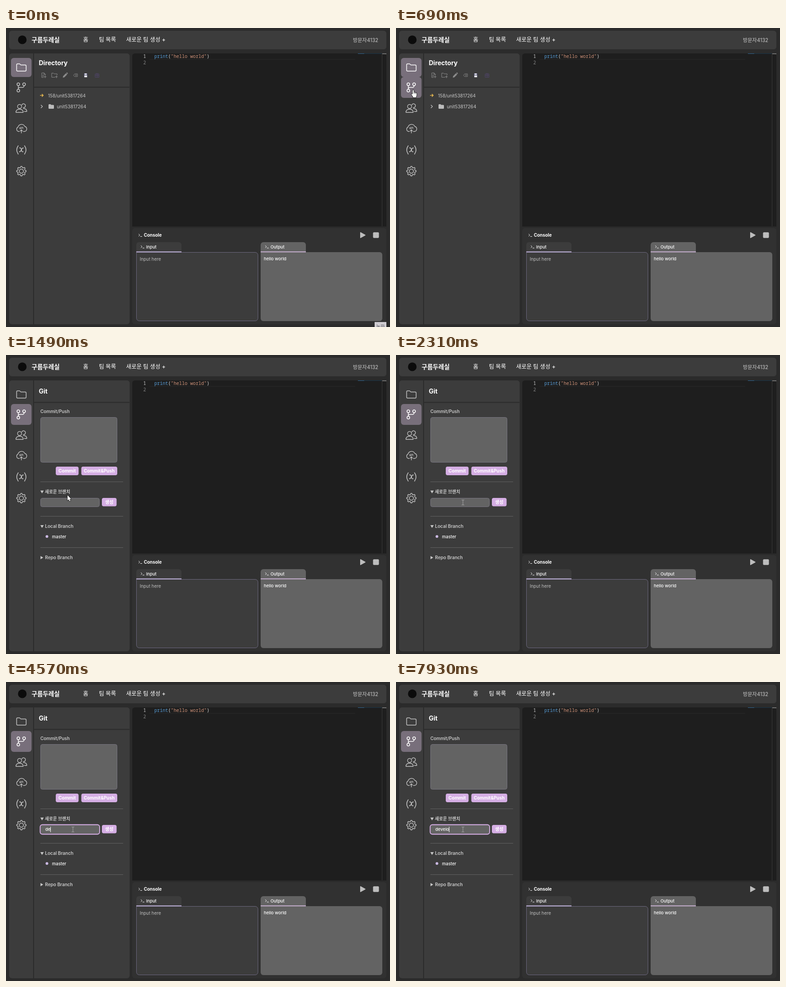
These frames come from a looping animation (849 px wide and 659 px high, 8000 ms). An HTML page with a canvas:

```html
<!DOCTYPE html>
<html lang="ko">
<head>
<meta charset="utf-8">
<title>Web IDE</title>
<style>
html, body { margin: 0; width: 100%; height: 100%; overflow: hidden; background: #2b2b2b; }
canvas { display: block; width: 849px; height: 659px; }
</style>
</head>
<body>
<canvas id="stage" width="849" height="659"></canvas>
<script>
const ctx = document.getElementById('stage').getContext('2d');
const LOOP = 8000;
const SANS = "Inter, 'Noto Sans CJK KR', 'Noto Sans CJK', sans-serif";
const MONO = "'Noto Sans Mono', monospace";
const C = {
  back: '#2b2b2b', panel: '#3c3c3c', editor: '#1e1e1e', console: '#313131',
  field: '#636363', edge: '#77747f', active: '#786f7b', pink: '#d5aee4',
  icon: '#c3c3c3', dim: '#8b8b8b', soft: '#c8c8c8', white: '#ffffff'
};

// Pointer steps: time, x, y of the tip
const POINTER = [
  [80, 560, 545], [160, 150, 300], [230, 45, 206], [320, 43, 190], [410, 41, 168],
  [500, 39, 150], [600, 38, 142], [690, 38, 137],
  [1230, 62, 190], [1320, 92, 238], [1400, 121, 286], [1490, 136, 309], [1600, 139, 330],
  [1670, 140, 346], [1850, 155, 366], [1940, 188, 402], [2030, 221, 436], [2120, 203, 404],
  [2210, 172, 356], [2310, 148, 325]
];
// Input steps: time, text, caret shown
const TYPING = [
  [2400, '', 1], [2860, '', 0], [3390, '', 1], [3940, '', 0],
  [4390, 'd', 1], [4570, 'de', 1], [4850, 'dev', 1], [5390, 'dev', 0], [5940, 'dev', 1],
  [6480, 'dev', 0], [6570, 'deve', 1], [6840, 'devel', 1], [7210, 'develp', 1],
  [7660, 'develp', 0], [7750, 'devel', 1], [7930, 'develo', 1]
];
const GIT_OPENS = 960;
const BUTTON_TOPS = [66, 108, 154, 199, 245, 291, 337];

const stepAt = (steps, t) => steps.filter(s => s[0] <= t).pop();

function text(str, x, y, size, color = C.white, weight = 400, family = SANS) {
  ctx.font = `${weight} ${size}px ${family}`;
  ctx.fillStyle = color;
  ctx.fillText(str, x, y);
  return ctx.measureText(str).width;
}

function rect(x, y, w, h, color) {
  ctx.fillStyle = color;
  ctx.fillRect(x, y, w, h);
}

function box(x, y, w, h, r, fill, line, width = 1) {
  ctx.beginPath();
  ctx.roundRect(x, y, w, h, r);
  ctx.fillStyle = fill;
  ctx.fill();
  if (line) {
    ctx.strokeStyle = line;
    ctx.lineWidth = width;
    ctx.stroke();
  }
}

function at(x, y, draw) {
  ctx.save();
  ctx.translate(x, y);
  draw();
  ctx.restore();
}

function stroke(d, color, width = 1.5) {
  ctx.strokeStyle = color;
  ctx.lineWidth = width;
  ctx.lineCap = ctx.lineJoin = 'round';
  ctx.stroke(new Path2D(d));
}

function fill(d, color) {
  ctx.fillStyle = color;
  ctx.fill(new Path2D(d));
}

function circle(x, y, r, color, width) {
  ctx.beginPath();
  ctx.arc(x, y, r, 0, Math.PI * 2);
  if (width) {
    ctx.strokeStyle = color;
    ctx.lineWidth = width;
    ctx.stroke();
  } else {
    ctx.fillStyle = color;
    ctx.fill();
  }
}

const sideIcons = [
  c => at(34, 87, () =>
    stroke('M-10.5-6Q-10.5-8-8.5-8H-4L-1-5.5H8.5Q10.5-5.5 10.5-3.5V6Q10.5 8 8.5 8H-8.5Q-10.5 8-10.5 6Z', c, 1.5)),
  c => {
    for (const [x, y] of [[27.3, 124], [40, 124], [27.3, 138]]) circle(x, y, 3, c, 1.6);
    stroke('M27.3 127V135M40 127Q40 131 36 131H31Q27.3 131 27.3 134', c, 1.6);
  },
  c => {
    circle(30, 173, 4.5, c, 1.4);
    stroke('M22 186Q22 179 30 179Q38 179 38 186Z', c, 1.4);
    stroke('M35 169.5A4.2 4.2 0 1 1 38 175.5M38.5 177.5Q46 177.5 46 184H40.5', c, 1.4);
  },
  c => {
    stroke('M29.5 228H28A5 5 0 0 1 26.5 218.5A8 8 0 0 1 41.5 217A5.6 5.6 0 0 1 41 228H38.5', c, 1.4);
    stroke('M34 231.5V225M31.5 227L34 224.5L36.5 227', c, 1.4);
    text('API', 29.2, 222.5, 5.5, c, 700);
  },
  c => {
    stroke('M27 259.5Q20.5 268.5 27 278M41 259.5Q47.5 268.5 41 278', c, 1.6);
    stroke('M30 264.5Q33 263 34 268.5Q35 274 38 272.5M38.5 264.5Q36 263.5 34 268.5Q32 273.5 29.5 272.5', c, 1.6);
  },
  c => at(34, 315.5, () => {
    ctx.beginPath();
    for (let i = 0; i <= 96; i++) {
      const a = i / 96 * Math.PI * 2;
      const r = 9.3 + 1.25 * Math.tanh(2.2 * Math.cos(8 * a));
      ctx.lineTo(r * Math.sin(a), -r * Math.cos(a));
    }
    ctx.closePath();
    ctx.strokeStyle = c;
    ctx.lineWidth = 1.5;
    ctx.stroke();
    circle(0, 0, 4.6, c, 1.5);
  })
];

function header() {
  box(7, 6, 834, 41, 6, C.panel);
  circle(36, 26, 9.5, '#0b0b0b');
  text('구름두레실', 56.5, 31, 13.5, C.white, 700);
  text('홈', 170.5, 30, 12.5, C.white, 500);
  text('팀 목록', 205.5, 30, 12.5, C.white, 500);
  text('새로운 팀 생성 +', 265.5, 30, 12.5, C.white, 500);
  text('방문자4132', 767, 30.5, 11.2, C.soft);
}

function sidebar(current, hovered) {
  box(7, 56, 53, 597, [6, 0, 0, 6], C.panel);
  sideIcons.forEach((draw, i) => {
    const lit = i === current || i === hovered;
    const top = BUTTON_TOPS[i];
    if (lit) box(11, top, 45.5, BUTTON_TOPS[i + 1] - top, 6, C.active);
    draw(lit ? C.white : C.icon);
  });
}

function directoryPanel() {
  text('Directory', 72.5, 81.5, 14, C.white, 700);
  rect(62, 129.5, 211, 2, C.back);

  stroke('M83 109H79V99H84L87 102V104M84 99V102H87M81 104H84M81 106.5H83M86.5 105V110M84 107.5H89', C.dim, 1);
  stroke('M108 108.5H101V99.5H105L106.5 101H113V104M111.5 105V110M109 107.5H114', C.dim, 1);
  fill('M125.5 109.5L126.3 106L132.5 99.8L135.2 102.5L129 108.7ZM133.2 99.2L134.2 98.2Q135 97.8 135.8 98.6L136.5 99.4Q137 100 136.5 100.8L135.8 101.8Z', C.dim);
  stroke('M149.5 104L152 101H158V107H152ZM153.5 102.8L156 105.2M156 102.8L153.5 105.2', C.dim, 0.9);
  box(172, 100, 8.5, 8.5, 1, '#44445a');
  rect(173.5, 100, 5.2, 3.3, '#d8d8e8');
  rect(173.2, 104.5, 6, 4, '#f2f2f2');
  stroke('M197.5 101.5H205.5V108.5H197.5ZM197.5 104.5H205.5M201.5 101.5V108.5M199.5 99.8L201.5 101.5L203.5 99.8', '#50446a', 1);

  stroke('M76 148.5H82M79.8 146L82.3 148.5L79.8 151', '#e7b850', 1.7);
  text('158/unit53817264', 93, 153, 9.9, C.soft);
  stroke('M77.5 170L80.7 173L77.5 176', C.soft, 1.2);
  fill('M94 169.5Q94 168 95.5 168H98.5L100 169.5H104.5Q106 169.5 106 171V176.5Q106 178 104.5 178H95.5Q94 178 94 176.5Z', '#bdbdbd');
  text('unit53817264', 112.5, 176.5, 10.1, C.soft);
}

function pinkButton(label, x, y, w, h, tx, size) {
  box(x, y, w, h, 4, C.pink);
  text(label, tx, y + h / 2 + 3.7, size, C.white, 700);
}

function gitPanel(input) {
  text('Git', 72.5, 84.5, 14, C.white, 700);
  rect(62, 103.5, 211, 2, C.back);

  text('Commit/Push', 76, 127.5, 9.9, C.soft, 600);
  box(76.5, 137.5, 169, 99, 4, C.field, C.edge);
  pinkButton('Commit', 110, 246, 50.5, 19, 116, 10.1);
  pinkButton('Commit&Push', 166.5, 246, 79.5, 19, 172, 9.8);
  for (const y of [279, 355, 424]) rect(76, y, 183, 1, '#616161');

  fill('M76 298.8H83.4L79.7 305Z', C.soft);
  text('새로운 브랜치', 86, 305, 9.7, C.soft, 600);
  if (input) box(75.5, 314.5, 131.5, 21, 5, C.field, '#dcb2ec', 1.8);
  else box(76.5, 315.5, 130, 19, 4, C.field, C.edge);
  if (input) {
    const width = text(input[1], 87, 328.3, 9.5, C.white, 500);
    if (input[2]) rect(Math.round(87 + width), 319, 1, 12, C.white);
  }
  pinkButton('생성', 212, 315, 32.5, 18.5, 219, 10);

  fill('M76 375H83.4L79.7 381.2Z', C.soft);
  text('Local Branch', 86.3, 381.3, 10, C.soft, 600);
  circle(90.5, 400, 3, '#cbb9e2');
  text('master', 101.8, 403.6, 9.5, C.white, 500);
  fill('M76.3 443L82.3 446.6L76.3 450.2Z', C.soft);
  text('Repo Branch', 86.3, 450.3, 10, C.soft, 600);
}

function editor() {
  box(279, 56, 562, 381.5, [6, 6, 0, 0], C.editor);
  rect(317, 68.5, 455, 1, '#2b2b2b');
  rect(778, 56, 14, 1, '#2f6793');
  rect(792, 56, 39, 1, '#173548');
  rect(831, 56, 1, 381, '#3a3a3a');
  rect(832, 56, 9, 1.5, '#858585');
  text('1', 303.5, 66, 10.17, '#c6c6c6', 400, MONO);
  text('2', 303.5, 79.5, 10.17, '#858585', 400, MONO);
  let x = 328;
  for (const [part, color] of [['print', '#569cd6'], ['(', '#dcdcdc'], ['"hello world"', '#ce9178'], [')', '#dcdcdc']])
    x += text(part, x, 66, 10.17, color, 400, MONO);
}

function prompt(x, y) {
  stroke(`M${x} ${y - 2.3}L${x + 2.4} ${y}L${x} ${y + 2.3}M${x + 3.8} ${y + 3}H${x + 7}`, C.white, 1);
}

function tab(label, x, color) {
  box(x, 472, 100, 22, [6, 6, 0, 0], color);
  prompt(x + 10.5, 482);
  text(label, x + 21.7, 485.6, 9.5, C.white, 500);
}

function consoleArea() {
  box(279, 441, 562, 212, 6, C.console);
  prompt(293.5, 456.5);
  text('Console', 304.7, 459.5, 9.9, C.white, 700);
  fill('M783 451Q783 449.6 784.4 450.2L794.4 455.8Q795.3 456.5 794.4 457.2L784.4 462.8Q783 463.4 783 462Z', '#bdbdbd');
  box(811.5, 450.2, 13, 12.6, 2, '#bdbdbd');
  tab('Input', 288, C.panel);
  tab('Output', 563, C.field);
  box(288.5, 494.5, 268.5, 151, [0, 6, 6, 6], C.panel, '#6d6880');
  box(563, 494, 269, 152, [0, 6, 6, 6], C.field);
  rect(288, 492.5, 100, 1.8, '#c4b5dd');
  rect(563, 492.5, 100, 1.8, '#d3b9de');
  text('Input here', 295.7, 513, 9.8, '#bebebe');
  text('hello world', 570, 512, 9.5, C.white, 500);
}

function tooltip() {
  ctx.save();
  ctx.beginPath();
  ctx.rect(815, 648, 26, 11);
  ctx.clip();
  rect(815, 648, 26, 11, '#d0cdd2');
  text('녹화', 818.5, 661.5, 10.3, '#5a5a60');
  ctx.restore();
}

function pointer(kind, x, y) {
  at(x, y, () => {
    if (kind === 'beam') {
      stroke('M-2.5-5.5H-.8L0-4.8L.8-5.5H2.5M0-4.8V4.8M-2.5 5.5H-.8L0 4.8L.8 5.5H2.5', '#a9a9a9', 1);
      return;
    }
    const d = kind === 'hand'
      ? 'M-1.3 1Q-1.3-.3 0-.3Q1.3-.3 1.3 1V5.2Q2.6 4.2 3.6 5.5Q4.9 4.7 5.7 6Q7.4 5.5 7.6 7.3V11Q7.6 13 6.5 14.2V16H-.3V14.4L-3.8 9.8Q-4.3 8.3-3 8.2Q-2 8.2-1.3 9.5Z'
      : 'M0 0V11.8L2.7 9.3L4.6 13.5L6.5 12.6L4.7 8.5H8.2Z';
    stroke(d, '#111111', 1.6);
    fill(d, C.white);
    if (kind === 'hand') stroke('M1.3 5.2V8M3.6 5.5V8M5.7 6V8.2', '#222222', 0.6);
  });
}

function draw(t) {
  const gitOpen = t >= GIT_OPENS;
  const tip = stepAt(POINTER, t);
  const input = stepAt(TYPING, t);
  const overSide = tip && tip[1] > 11 && tip[1] < 57;
  const hovered = overSide ? BUTTON_TOPS.findIndex((top, i) => tip[2] >= top && tip[2] < BUTTON_TOPS[i + 1]) : -1;

  rect(0, 0, 849, 659, C.back);
  header();
  sidebar(gitOpen ? 1 : 0, hovered);
  box(62, 56, 211.5, 597, [0, 6, 6, 0], C.panel);
  if (gitOpen) gitPanel(input);
  else directoryPanel();
  editor();
  consoleArea();

  if (!tip) return tooltip();
  const overInput = tip[1] > 76 && tip[1] < 206 && tip[2] > 315 && tip[2] < 326 && gitOpen;
  pointer(hovered >= 0 ? 'hand' : overInput ? 'beam' : 'arrow', tip[1], tip[2]);
}

const start = performance.now();
function frame() {
  draw((performance.now() - start) % LOOP);
  requestAnimationFrame(frame);
}
frame();
</script>
</body>
</html>
```
